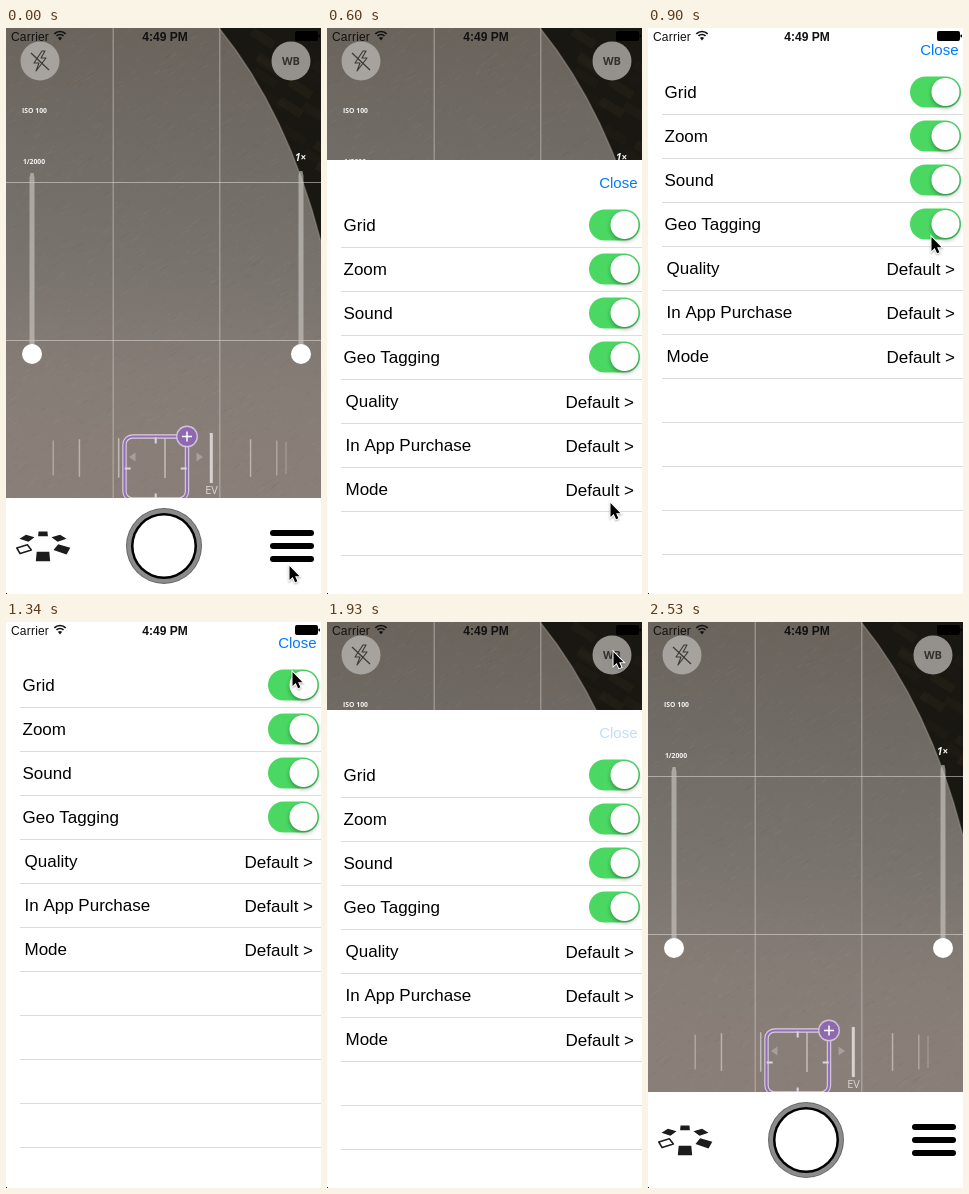
Write an HTML page with a canvas that moves like this. It is 315x566 px and loops after 2.83 s.

```html
<!DOCTYPE html>
<html lang="en">
<head>
<meta charset="utf-8">
<title>Camera settings sheet</title>
<style>
html, body { margin: 0; width: 100%; height: 100%; overflow: hidden; background: #fff; }
canvas { display: block; width: 315px; height: 566px; }
</style>
</head>
<body>
<canvas id="stage" width="315" height="566"></canvas>
<script>
const W = 315, H = 566, LOOP = 2830, STEP = 148, VIEW_H = 470, ROW = 44;
const SANS = '"Liberation Sans", Arial, sans-serif';
const HUMAN = '"Open Sans", sans-serif';
const ctx = document.getElementById('stage').getContext('2d');

const clamp01 = v => Math.min(1, Math.max(0, v));
const smooth = p => p * p * (3 - 2 * p);

// Motion, as functions of the whole step k
function sheetTop(k) {
  const opening = 134 * 0.105 ** (k - 4);
  const closing = 568 * smooth(clamp01((k - 12.516) / 1.925));
  return Math.min(H, Math.round(opening + closing - 2));
}

function cursorAt(k) {
  const glide = 29 + 445 * Math.max(0, (12 - k) / 8) ** 3.17;
  return {
    x: k > 6 && k < 14 ? 285 : 282,
    y: Math.round(Math.min(537, glide) + 60 * Math.max(0, k - 13))
  };
}

const closeAlpha = k => k < 12 ? 1 : 0.25 + 0.6 * Math.max(0, k - 13);

function random(seed) {
  return () => (seed = (seed * 16807) % 2147483647) / 2147483647;
}

function text(g, str, x, y, font, color, align = 'left', spacing = 0) {
  g.font = font;
  g.fillStyle = color;
  g.textAlign = align;
  g.letterSpacing = spacing + 'px';
  g.fillText(str, x, y);
}

function line(g, x1, y1, x2, y2, color, width = 1) {
  g.strokeStyle = color;
  g.lineWidth = width;
  g.beginPath();
  g.moveTo(x1, y1);
  g.lineTo(x2, y2);
  g.stroke();
}

function disc(g, x, y, r, color) {
  g.fillStyle = color;
  g.beginPath();
  g.arc(x, y, r, 0, Math.PI * 2);
  g.fill();
}

function path(g, pts) {
  g.beginPath();
  for (let i = 0; i < pts.length; i += 2) g.lineTo(pts[i], pts[i + 1]);
  g.closePath();
}

function poly(g, pts, color) {
  g.fillStyle = color;
  path(g, pts);
  g.fill();
}

function pill(g, x, y, w, h, r, color) {
  g.fillStyle = color;
  g.beginPath();
  g.roundRect(x, y, w, h, r);
  g.fill();
}

function drawScene(g) {
  const rnd = random(41);
  const shade = g.createLinearGradient(0, 0, -30, VIEW_H);
  shade.addColorStop(0, '#6a645d');
  shade.addColorStop(0.45, '#77726c');
  shade.addColorStop(0.75, '#877d77');
  shade.addColorStop(1, '#8a7e78');
  g.fillStyle = shade;
  g.fillRect(0, 0, W, VIEW_H);

  // woven grain
  for (let i = 0; i < 1500; i++) {
    const x = rnd() * W, y = rnd() * VIEW_H, len = 2 + rnd() * 6;
    const tone = rnd() < 0.5 ? '255,240,225' : '30,25,30';
    line(g, x, y, x + len, y - len * 0.6, `rgba(${tone},0.04)`);
  }

  const edge = new Path2D('M213 0Q282 85 315 214');
  const corner = new Path2D(edge);
  corner.lineTo(W, 0);
  g.save();
  g.clip(corner);
  g.fillStyle = '#181711';
  g.fillRect(0, 0, W, VIEW_H);
  for (let i = 0; i < 24; i++) {
    const x = 225 + rnd() * 90, y = rnd() * 150;
    line(g, x, y, x + 22, y + 14, `rgba(92,76,54,${rnd() * 0.16})`, 9);
  }
  g.restore();
  g.strokeStyle = 'rgba(165,157,148,0.45)';
  g.lineWidth = 1.5;
  g.stroke(edge);
}

function drawButtons(g) {
  for (const x of [34, 285]) disc(g, x, 33, 19.5, 'rgba(184,180,176,0.78)');
  g.strokeStyle = '#3c3835';
  g.lineWidth = 1.1;
  g.lineJoin = 'round';
  path(g, [36, 23, 28, 35, 33, 35, 30, 43, 40, 30, 35, 30, 39, 23]);
  g.stroke();
  line(g, 25, 25, 43, 42, '#3c3835', 1.2);

  const pale = '#f6f4f2';
  text(g, 'WB', 285, 37, '700 11px ' + HUMAN, '#33302d', 'center');
  text(g, 'ISO 100', 28.5, 85, '700 6.8px ' + HUMAN, pale, 'center');
  text(g, '1/2000', 28, 136, '700 6.8px ' + HUMAN, pale, 'center');
  text(g, '1×', 294.5, 133, 'italic 700 10px ' + HUMAN, pale, 'center');
}

function drawSlider(g, x, top) {
  const track = 'rgba(205,202,198,0.62)';
  poly(g, [x - 1.5, top, x + 1.5, top, x + 2.5, top + 5, x + 2.5, 320, x - 2.5, 320, x - 2.5, top + 5], track);
  disc(g, x, 326, 10, '#fff');
}

// Ticks on a wheel seen from the side
function drawExposure(g) {
  for (let i = -3; i <= 4; i++) {
    const a = i * Math.PI / 8, x = 159 + 121 * Math.sin(a);
    const half = i === 1 ? 25 : 16 + 4 * Math.cos(a);
    const alpha = i === 1 ? 0.8 : 0.25 + 0.35 * Math.cos(a);
    line(g, x, 430 - half, x, 430 + half, `rgba(235,232,228,${alpha})`, i === 1 ? 3 : 1.5);
  }
  text(g, 'EV', 205.5, 466, '11px ' + HUMAN, '#dad7d3', 'center');
  for (const side of [-1, 1]) {
    const tip = 160 + side * 37, back = tip - side * 6.5;
    poly(g, [tip, 429, back, 424.5, back, 433.5], '#a5a09b');
  }
}

function drawReticle(g) {
  for (const [color, width] of [['#d9d0e0', 4.4], ['#946eb6', 2.2]]) {
    g.strokeStyle = color;
    g.lineWidth = width;
    g.beginPath();
    g.roundRect(118.5, 408.5, 62.5, 63, 8);
    g.stroke();
  }
  for (let i = 0; i < 4; i++) {
    const dx = Math.cos(i * Math.PI / 2), dy = Math.sin(i * Math.PI / 2);
    line(g, 149.7 + dx * 25, 440.5 + dy * 25, 149.7 + dx * 31, 440.5 + dy * 31, '#dcd5e2', 2);
  }
  disc(g, 181, 408.5, 11, '#cfc2da');
  disc(g, 181, 408.5, 9.6, '#8f69b0');
  line(g, 176, 408.5, 186, 408.5, '#fff', 1.5);
  line(g, 181, 403.5, 181, 413.5, '#fff', 1.5);
}

// Six tiles in a ring, lying flat in perspective; one is hollow
function drawTiles(g) {
  for (let i = 0; i < 6; i++) {
    const a = i * Math.PI / 3 - Math.PI / 2, cos = Math.cos(a), sin = Math.sin(a);
    const hollow = i === 4, inset = hollow ? 0.8 : 0;
    const pts = [[-1, -1], [1, -1], [1, 1], [-1, 1]].flatMap(([u, v]) => {
      const r = 20 + u * (6 - inset), w = v * (5.5 - inset);
      const x = r * cos - w * sin, z = r * sin + w * cos, s = 1 / (1 - z * 0.009);
      return [37 + x * s, 515 + z * s * 0.54];
    });
    if (!hollow) poly(g, pts, '#1c1c1c');
    else {
      path(g, pts);
      g.strokeStyle = '#1c1c1c';
      g.lineWidth = 1.6;
      g.stroke();
    }
  }
}

function drawToolbar(g) {
  g.fillStyle = '#fff';
  g.fillRect(0, VIEW_H, W, H - VIEW_H);
  drawTiles(g);
  disc(g, 158, 518, 38, '#666');
  disc(g, 158, 518, 37, '#8b8b8b');
  disc(g, 158, 518, 33, '#000');
  disc(g, 158, 518, 30.5, '#fff');
  for (let i = -1; i <= 1; i++) pill(g, 264, 515 + i * 13, 44, 6, 3, '#000');
}

function drawCamera(g) {
  drawScene(g);
  const grid = 'rgba(225,221,217,0.55)';
  for (let i = 0; i < 2; i++) {
    const x = 320 / 3 * (i + 1) + 0.5, y = 154.5 + i * 158;
    line(g, x, 0, x, VIEW_H, grid);
    line(g, 0, y, W, y, grid);
  }
  drawButtons(g);
  drawSlider(g, 26, 145);
  drawSlider(g, 295, 143);
  drawExposure(g);
  drawReticle(g);
  drawToolbar(g);
}

function drawSwitch(g, y) {
  pill(g, 262, y - 15.5, 51, 31, 15.5, '#4ad863');
  g.save();
  g.shadowColor = 'rgba(0,0,0,0.35)';
  g.shadowBlur = 4;
  g.shadowOffsetY = 2;
  disc(g, 297.5, y, 14, '#fff');
  g.restore();
}

function drawSheet(g, top, alpha) {
  if (top >= H) return;
  g.fillStyle = '#fff';
  g.fillRect(0, top, W, H - top);
  text(g, 'Close', 310.5, top + 28, '15px ' + SANS, `rgba(0,122,255,${alpha})`, 'right');

  const font = '17px ' + SANS;
  const labels = ['Grid', 'Zoom', 'Sound', 'Geo Tagging', 'Quality', 'In App Purchase', 'Mode'];
  labels.forEach((label, i) => {
    const y = top + 65 + i * ROW, toggle = i < 4;
    text(g, label, toggle ? 16.5 : 18.5, y + 6, font, '#000');
    if (toggle) drawSwitch(g, y);
    else text(g, 'Default >', 307, y + 7, font, '#000', 'right');
  });
  g.fillStyle = '#dcdcde';
  for (let i = 0; i < 11; i++) g.fillRect(14, top + 87 + i * ROW, W - 14, 1);
}

function drawStatus(g) {
  text(g, 'Carrier', 5, 12.5, '12px ' + SANS, '#111', 'left', 0.2);
  text(g, '4:49 PM', 159, 12.5, 'bold 12px ' + SANS, '#111', 'center');

  g.strokeStyle = '#111';
  g.lineWidth = 1.7;
  for (const r of [8, 5]) {
    g.beginPath();
    g.arc(54, 11.5, r, -Math.PI * 0.75, -Math.PI * 0.25);
    g.stroke();
  }
  poly(g, [54, 12.5, 51.8, 9.8, 54, 8.9, 56.2, 9.8], '#111');

  pill(g, 289, 3, 23, 10, 2, '#000');
  pill(g, 312.5, 6.5, 1.5, 3, 0.7, '#000');
}

function drawCursor(g, { x, y }) {
  g.save();
  g.translate(x + 1.5, y + 1);
  g.shadowColor = 'rgba(0,0,0,0.3)';
  g.shadowBlur = 2;
  g.shadowOffsetY = 1;
  path(g, [0, 0, 0, 14, 3.2, 11, 5.6, 16.2, 7.9, 15.2, 5.6, 10.2, 10, 10.2]);
  g.lineJoin = 'miter';
  g.lineWidth = 2;
  g.strokeStyle = '#fff';
  g.stroke();
  g.shadowColor = 'transparent';
  g.fillStyle = '#000';
  g.fill();
  g.restore();
}

const camera = document.createElement('canvas');
camera.width = W;
camera.height = H;
drawCamera(camera.getContext('2d'));

const start = performance.now();

function render() {
  const t = Math.max(0, performance.now() - start) % LOOP;
  const k = Math.floor(t / STEP);
  ctx.drawImage(camera, 0, 0);
  drawSheet(ctx, sheetTop(k), closeAlpha(k));
  drawStatus(ctx);
  ctx.fillStyle = '#222';
  ctx.fillRect(0, H - 1, 1, 1);
  if (k < 15) drawCursor(ctx, cursorAt(k));
  requestAnimationFrame(render);
}
render();
</script>
</body>
</html>
```
